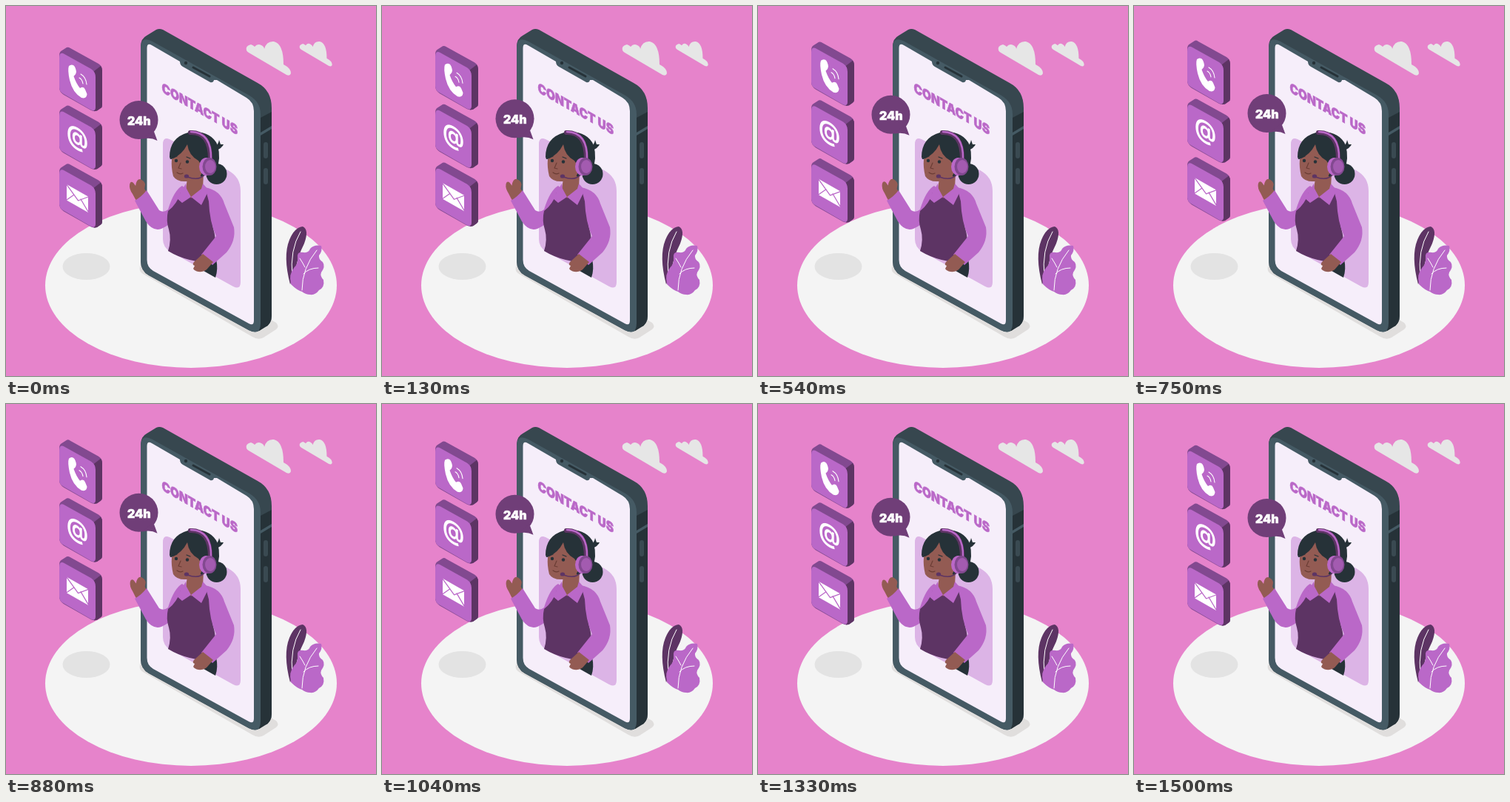
An HTML page that plays this animation: 500 by 500 pixels, repeating every 1540 ms.

```html
<!DOCTYPE html>
<html lang="en">
<head>
<meta charset="utf-8">
<style>
  html, body { margin: 0; width: 100%; height: 100%; overflow: hidden; background: #e683cb; }
  svg { display: block; width: 100vw; height: 100vh; }
  text { font-family: Inter, sans-serif; font-weight: 900; }
  .line { fill: none; stroke-linecap: round; stroke-linejoin: round; }
  .skin { fill: #935b53; }
  .lilac { fill: #ba68c8; }
  .plum { fill: #5d3464; }
  .ink { fill: #263238; }
</style>
</head>
<body>
<svg viewBox="0 0 500 500">
  <defs>
    <path id="cloud" fill="#e6e6e6" d="M325 60Q323 54 331 52Q334 53 336 55Q340 50 345 53Q349 55 349 58Q352 47 362 48Q375 51 375 79Q385 84 385 91Q384 95 379 93L328 63Q326 62 325 60Z"/>
    <g id="tile">
      <path fill="#824990" d="M72 67Q72 62 75 60.500L82 56Q84 55 87 57L125 78Q130 81 130 87V134Q130 137 128 138L123 141.500Q119 143 115 141L78 120Q72 116 72 110Z"/>
      <path class="plum" d="M119 88L128 81Q130 84 130 87V134Q130 137 128 138L123 141.500L119 142Z"/>
      <path class="lilac" d="M72 70Q72 61 79 65L115 85Q121 89 121 96V137Q121 143 115 140.500L78 119Q72 116 72 110Z"/>
    </g>
  </defs>

  <ellipse cx="250" cy="377.500" rx="197" ry="111.500" fill="#f4f4f4"/>
  <ellipse cx="108.500" cy="352" rx="32" ry="18" fill="#e3e3e3"/>
  <path fill="#e0dedd" d="M184 347L181 353Q179 358 185 362L333 447Q341 452 348 448L365 437Q370 433 365 428L358 424Z"/>
  <use href="#cloud"/>
  <use href="#cloud" transform="translate(159.700 13) scale(.73)"/>

  <g id="plant">
    <path class="plum" d="M384 376Q374 338 383 316Q390 299 401 298Q410 302 403 321Q393 340 390 364Z"/>
    <path class="line" stroke="#fff" d="M387 366Q383 330 398 305"/>
    <path class="lilac" d="M385 376Q382 362 389 354Q395 348 394 340Q393 331 402 333Q409 334 411 328Q416 322 426 324Q428 331 423 337Q422 342 428 346Q432 352 426 360Q424 365 429 370Q431 380 423 384Q418 391 411 390Q405 390 400 386Q393 384 385 376Z"/>
    <path class="line" stroke="#fff" d="M400 384Q400 354 420 330M397 341Q401 347 404 353M422 354Q409 354 402 362"/>
  </g>

  <g id="phone">
    <path fill="#37474f" d="M182 55Q182 44 190 40L203 32Q207 30 212 32L340 104Q359 114 359 138V418Q359 430 350 434L342 439Q336 442 328 438L193 364Q182 358 182 344Z"/>
    <path class="ink" d="M342 152L359 143V418Q359 430 350 434L342 439Z"/>
    <path fill="#455a64" d="M344 171L359 162V166L344 175Z"/>
    <path class="line" stroke="#3a4a52" stroke-width="6" d="M351 187V203M351 222V238"/>
    <path fill="#455a64" d="M182 55Q183 40 198 48L329 121Q344 130 344 146V429Q344 446 328 438L193 364Q182 358 182 344Z"/>
    <path fill="#f6eefa" d="M190.500 57Q190.500 49 197 53L235 75Q235 80 239 82L276 103Q280 104 281 100L285 100L325 124Q335 130 335 142V425Q335 433 328 429L199 358Q190.500 353 190.500 343Z"/>
    <circle class="ink" cx="243" cy="77" r="2.200"/>
    <path class="line" stroke="#263238" stroke-width="3" d="M253 83L275 95"/>
    <text class="lilac" font-size="17.800" stroke="#ba68c8" stroke-width=".6" transform="matrix(.866 .495 0 1 210.500 116)">CONTACT US</text>
    <path fill="#dcb4e6" d="M212 187Q212 176 221 180L300 222Q317 231 317 250V373Q317 384 307 379L222 332Q212 326 212 315Z"/>
  </g>

  <g id="agent">
    <path class="ink" d="M255 343L284 342Q287 356 283 367L260 354Z"/>
    <path class="ink" d="M282 191Q287 187 288 181L290 187L294 187Q292 192 284 195Z"/>
    <circle class="ink" cx="284.500" cy="227" r="14"/>
    <path id="hand" class="skin" d="M167 241Q168 236 172 239L175 243Q176 234 181 234Q187 236 188 241L187 247L191 253L178 266Q174 260 171 254Q166 247 167 241Z"/>
    <path class="lilac" d="M238 243Q227 249 219 275Q213 280 207 276L190 249Q183 258 174 263L189 291Q198 305 210 301Q222 296 230 284L262 262Z"/>
    <path class="plum" d="M236 252Q231 268 219 277Q216 290 220 302Q224 316 219 331Q245 347 283 347Q286 320 279 296L276 247L250 258Z"/>
    <path class="lilac" d="M269 245Q290 249 295 267L308 299Q311 317 298 333L279 350L264 336L284 311Q275 292 274 264Z"/>
    <path class="skin" d="M266 335L254 346Q251 350 255 351L253 355Q255 358 260 359Q269 360 273 354L280 346Z"/>
    <path class="skin" d="M246 228L267 226L266 246L250 260L243 246Z"/>
    <path class="lilac" d="M243 240L231 260L238 266L250 258L244 247ZM266 240L274 249L264 269L250 258L264 247Z"/>
    <path class="ink" d="M221 204Q221 178 246 171Q276 167 286 188Q291 207 284 222L264 231L240 200Q232 207 222 207Z"/>
    <path class="skin" d="M224 207Q238 201 245 187Q247 202 260 209L267 220L263 229Q254 237 244 237Q231 238 226 230Q223 218 224 207Z"/>
    <circle class="ink" cx="230" cy="209" r="2.200"/>
    <circle class="ink" cx="245" cy="210.500" r="2.200"/>
    <path class="line" stroke="#263238" stroke-width="1.200" d="M227 204L231 203M244 204L249 206"/>
    <path class="line" stroke="#6b3d35" stroke-width="1.200" d="M236 212L233 219L237 220M231 225Q235 228 239 226"/>
    <path class="line" stroke="#5d3464" stroke-width="6" d="M249 171Q276 170 276 207"/>
    <path class="line" stroke="#ba68c8" stroke-width="2.500" d="M250 170Q278 171 277 207"/>
    <path class="line" stroke="#5d3464" stroke-width="1.500" d="M269 227Q262 237 245 231"/>
    <ellipse class="plum" cx="244" cy="230" rx="3.200" ry="2.600"/>
    <ellipse class="lilac" cx="270.500" cy="217" rx="9.500" ry="12"/>
    <ellipse cx="275" cy="217" rx="9.500" ry="12" fill="#824990"/>
    <ellipse cx="276" cy="217" rx="7" ry="9" fill="#a35bb0"/>
  </g>

  <g id="float">
    <use href="#tile"/>
    <use href="#tile" y="78.800"/>
    <use href="#tile" y="157.600"/>
    <path fill="#fff" d="M85 81Q88 78.500 91 80Q94 82 95 89Q95 92 91.500 95Q95 105 100 111Q105 108 107 113L109.500 119Q109 126 102 124Q90 117 86 100Q83 86 85 81Z"/>
    <path class="line" stroke="#fff" stroke-width="1.100" d="M99 97Q103 99 104 105M101 92Q108 96 109 106"/>
    <text fill="#fff" font-size="33" text-anchor="middle" transform="matrix(.866 .495 0 1 96.500 188)" style="font-weight:700">@</text>
    <path fill="#fff" d="M82 241L111 257.500V279L82 262.500Z"/>
    <path class="line" stroke="#ba68c8" stroke-width="1.300" d="M82 241.500L97.500 263L111 258M82 262L92 255M111 278L101 261"/>
    <circle cx="179.500" cy="154" r="26" fill="#703e78"/>
    <path fill="#703e78" d="M184 180Q195 177 204.500 182L199 167Z"/>
    <text x="164" y="161" font-size="16" fill="#fff" stroke="#fff" stroke-width=".5">24h</text>
  </g>
</svg>
<script>
  const LOOP = 1540, PERIOD = 1500, PHASE = 35, RISE = 10;
  const float = document.getElementById('float');
  const hand = document.getElementById('hand');
  const start = performance.now();

  function draw() {
    const time = (performance.now() - start) % LOOP;
    const p = ((time + PHASE) % PERIOD) / PERIOD;
    const lift = 1 - Math.abs(2 * p - 1);
    float.setAttribute('transform', `translate(0 ${0.47 - RISE * lift})`);
    hand.setAttribute('transform', `rotate(${2 * Math.min(1, lift * 3)} 187 264)`);
    requestAnimationFrame(draw);
  }
  draw();
</script>
</body>
</html>
```
